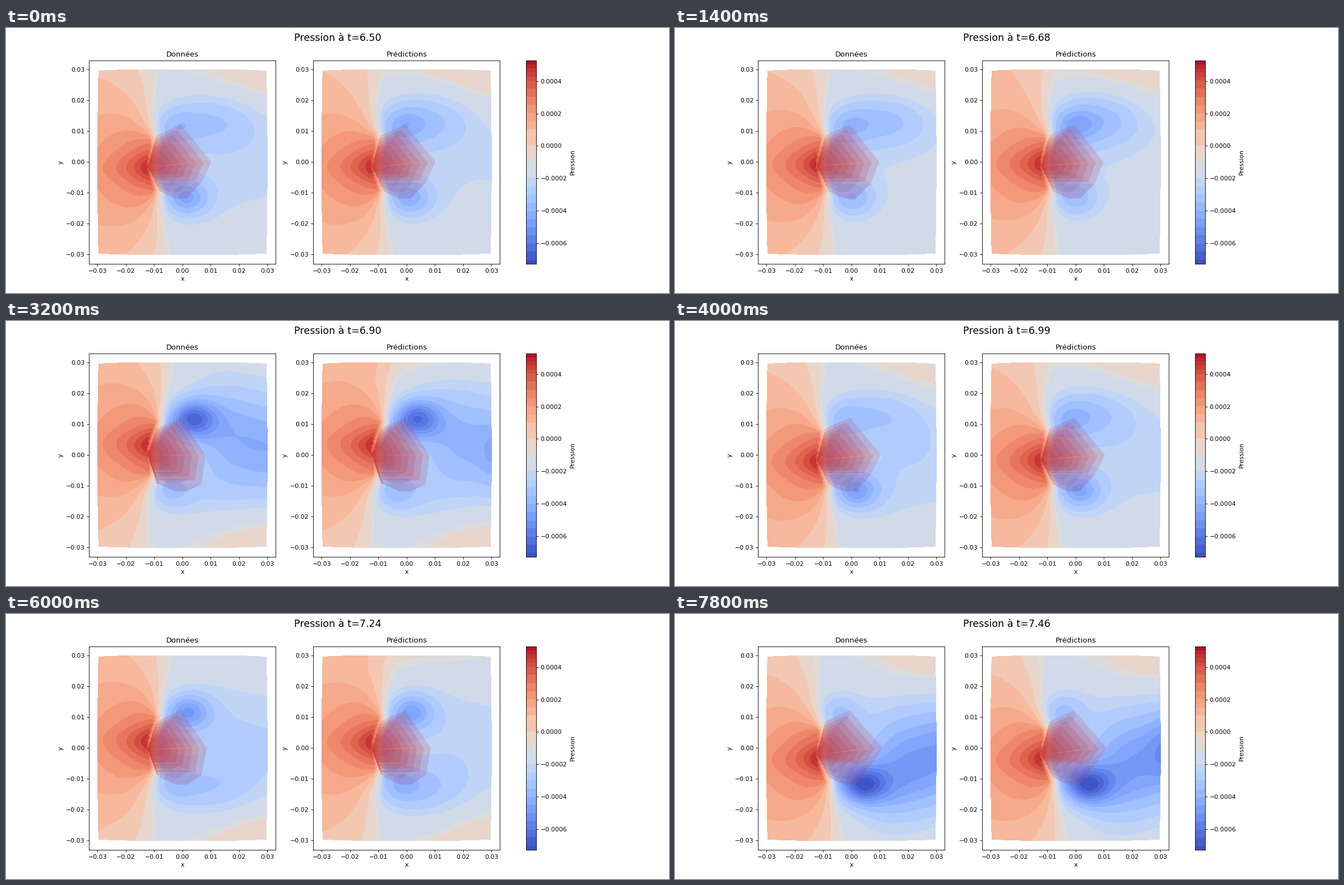
A matplotlib script for the animation above (8000 ms loop, 1183 by 473 pixels).

```python
import numpy as np
import matplotlib.pyplot as plt
from matplotlib.animation import FuncAnimation
from matplotlib.colors import ListedColormap, BoundaryNorm
from matplotlib.patches import Polygon

W, H, DPI = 1183, 473, 80
FRAMES, INTERVAL = 40, 200
T0, DT = 6.504, 0.0245
VMIN, VMAX = -0.00073, 0.00053
UNIT = 0.01  # model lengths are in hundredths

plt.rcParams.update({
    "font.family": "DejaVu Sans",
    "font.size": 9.86,
    "axes.titlesize": 11.83,
})

# Pressure is handled on a 0..50 scale spanning VMIN..VMAX.
BAR_EDGES = np.array([0, 1, 3, 5, 7, 9, 11, 13, 15, 17, 19, 21, 25, 29, 33, 35,
                      37, 39, 41, 43, 45, 46, 47, 48, 49, 50.0])
FIELD_EDGES = np.array([0, 2, 4, 6, 8, 10, 12, 14, 16.5, 19, 21, 24.5, 25.5, 29,
                        32, 34.5, 36.5, 38.5, 40.5, 42.5, 44.5, 46.5, 48.2, 50])


def band_colors(edges):
    return plt.get_cmap("coolwarm")((edges[:-1] + edges[1:]) / 100)


u, v = np.meshgrid(np.linspace(-1, 1, 151), np.linspace(-1, 1, 151))
X = 3 * u * (1 - 0.012 * v**2)
Y = 3 * v * (1 - 0.015 * u**4)


def bump(x0, y0, sx, sy, y=Y):
    return np.exp(-((X - x0) / sx) ** 2 / 2 - ((y - y0) / sy) ** 2 / 2)


def phase(i):
    return 2 * np.pi * (-0.1492 * i - 0.17)


def front_pressure(x, ys):
    """High pressure ahead of the body: angle subtended by its two shoulders."""
    ax_, ay = -0.96 + 0.38 * ys - x, 0.86 + 0.6 * ys - Y
    bx, by = -0.96 - 0.38 * ys - x, -0.86 + 0.6 * ys - Y
    a = np.arctan2(bx * ay - by * ax_, ax_ * bx + ay * by) / np.pi
    strength = np.abs(a) ** 0.52
    focus = 9 * a**2 * (1 - np.exp(-(Y - ys) ** 2 / 0.25))
    return np.where(a > 0, 25 + 25.5 * strength - focus, 25 - 6.5 * strength)


def smooth_front(ys):
    """Bow the front around the nose and spread the jump across the body."""
    x = X + 0.22 * np.exp(-((Y - ys) / 0.6) ** 2)
    shifts = np.linspace(-0.3, 0.08, 10)
    return np.mean([front_pressure(x + s, ys) for s in shifts], axis=0)


def pressure(theta, predicted):
    if predicted:
        theta = theta - 0.1
    p = smooth_front(-0.39 * np.cos(theta))

    # The upper side repeats the lower one half a period later.
    for side, ph in ((-1, theta), (1, theta + np.pi)):
        y = side * Y
        near = 9 + 5.5 * np.cos(ph) + 2.5 * np.cos(2 * ph)
        shed = 7.4 * ((1 + np.cos(ph - 1.49)) / 2) ** 3
        shed_x = 1.35 - 0.5 * np.sin(ph - 1.64)
        if predicted:
            shed_x -= 0.5
            shed *= 1.05
        p -= near * bump(-0.08 + 0.42 * np.cos(ph), 1.18, 0.6, 0.45, y)
        p -= shed * bump(shed_x, 1.38, 1.2, 0.66, y)
        p += 3.7 * (1 - np.cos(ph + 0.5)) * bump(3.3, 3.5, 1.8, 1.05, y)

    wake = 6.9 + 6.4 * np.cos(2 * (theta - 0.1))
    center = -np.cos(theta) * (1.0 - 0.25 * X)
    onset = 1 / (1 + np.exp(-(X - 0.75) / 0.45))
    p -= wake * onset * np.exp(-((Y - center) / 1.25) ** 2 / 2)
    if predicted:
        p -= 0.2 * wake * bump(3.1, 0, 0.35, 0.7)
        p += 1.7 * (1 - np.cos(theta)) * bump(0.6, 3.3, 2.2, 0.5)
    return np.clip(p, 0.5, 49)


def body_shapes(theta):
    """Translucent nested chevrons over the body, as (points, colour, alpha)."""
    c = np.cos(theta)
    nose = np.array([-1.22, -0.1 - 0.12 * c])
    low = -0.75 + 0.2 * c
    chevron = np.array([nose, (-0.93, 0.86), (-0.05, 1.22), (0.95 + 0.15 * c, 0),
                        (0.68, low), (-0.9, low)])
    under = np.array([nose, (-0.9, low), (0.68, low), (0.15, -1.18),
                      (-0.25, -1.18), (-0.8, -0.95)])
    shapes = [(under, "#9a3468", 0.22)]
    for s in np.linspace(1, 0.28, 7):
        shapes.append((nose + s * (chevron - nose), "#be2832", 0.16))
    for s in (0.8, 0.6, 0.4):
        shapes.append((nose + s * (under - nose), "#8a3a70", 0.14))
    streak = np.array([nose, (0.7, 0.04), (0.7, -0.04)])
    shapes.append((streak, "#f0a080", 0.25))
    return shapes


fig = plt.figure(figsize=(W / DPI, H / DPI), dpi=DPI, facecolor="white")


def px_axes(left, right, top=57.6, bottom=421):
    return fig.add_axes([left / W, 1 - bottom / H, (right - left) / W,
                         (bottom - top) / H])


def make_panel(left, right, title):
    ax = px_axes(left, right)
    ax.set(xlim=(-0.033, 0.033), ylim=(-0.033, 0.033), xlabel="x", ylabel="y")
    ax.set_xticks(np.arange(-3, 4) * UNIT)
    ax.set_yticks(np.arange(-3, 4) * UNIT)
    ax.set_title(title)
    return ax


panels = [make_panel(148.3, 481.3, "Données"),
          make_panel(548.3, 881.3, "Prédictions")]

bar = px_axes(927.8, 945.8)
bar_colors = band_colors(BAR_EDGES)
bar.pcolormesh([0, 1], VMIN + BAR_EDGES / 50 * (VMAX - VMIN),
               np.arange(len(bar_colors))[:, None] + 0.5,
               cmap=ListedColormap(bar_colors),
               norm=BoundaryNorm(np.arange(len(bar_colors) + 1), len(bar_colors)))
bar.set(ylim=(VMIN, VMAX), xticks=[], yticks=np.arange(-3, 3) * 0.0002)
bar.yaxis.tick_right()
bar.yaxis.set_label_position("right")
bar.set_ylabel("Pression")

heading = fig.suptitle("", fontsize=15.77, y=0.98)
field_colors = band_colors(FIELD_EDGES)
drawn = []


def update(i):
    while drawn:
        drawn.pop().remove()
    theta = phase(i)
    for k, ax in enumerate(panels):
        drawn.append(ax.contourf(X * UNIT, Y * UNIT, pressure(theta, k == 1),
                                 levels=FIELD_EDGES, colors=field_colors))
        for pts, color, alpha in body_shapes(theta):
            patch = Polygon(pts * UNIT, facecolor=color, alpha=alpha, lw=0, zorder=1.5)
            drawn.append(ax.add_patch(patch))
    heading.set_text(f"Pression à t={T0 + DT * i:.2f}")
    return [heading]


anim = FuncAnimation(fig, update, frames=FRAMES, interval=INTERVAL,
                     repeat=True, repeat_delay=0, blit=False)
plt.show()
```
